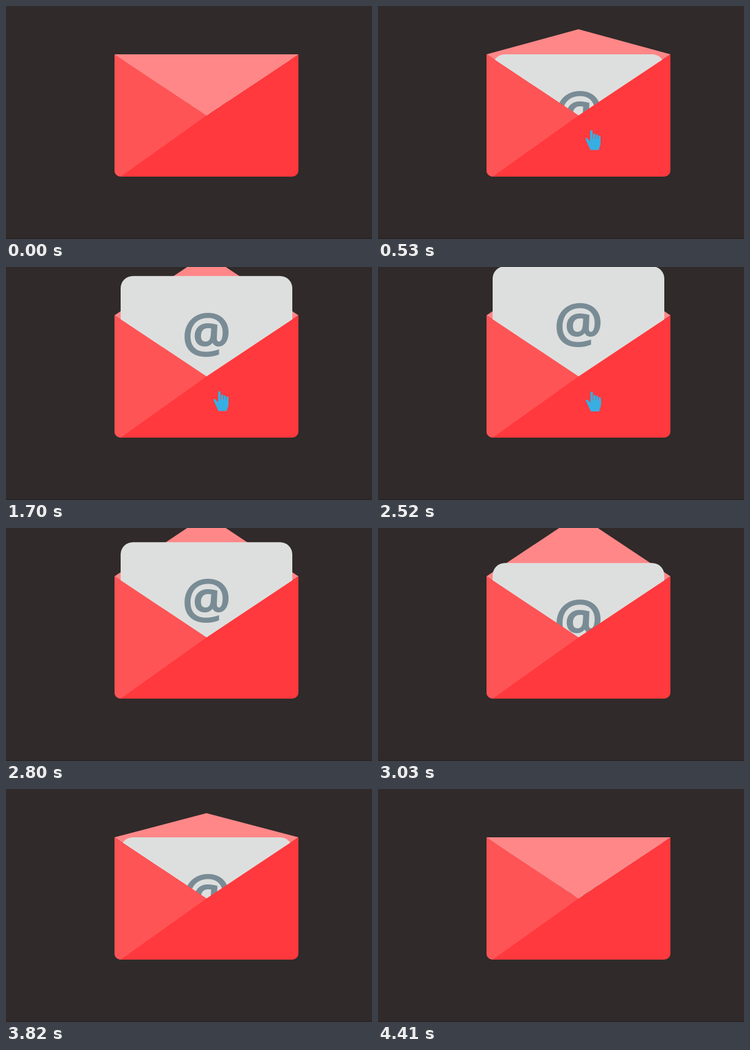
An HTML page that plays this animation: 597x381 px, repeating every 4610 ms.

```html
<!DOCTYPE html>
<html lang="en">
<head>
<meta charset="utf-8">
<title>Envelope</title>
<style>
  html, body { margin: 0; width: 100%; height: 100%; overflow: hidden; background: #302a2a; }
  svg { display: block; width: 597px; height: 381px; }
  text { font: 700 90px "Open Sans", "Noto Sans", sans-serif; }
</style>
</head>
<body>
<svg viewBox="0 0 597 381">
  <rect width="597" height="381" fill="#302a2a"/>
  <rect y="379" width="597" height="2" fill="#2a2424"/>
  <path d="M177 79H477L327 180Z" fill="#ff8788"/>
  <path id="flapBack" fill="#ff8788"/>
  <g id="letter">
    <rect x="187" width="280" height="190" rx="20" fill="#dddfde"/>
    <text x="327" y="125" text-anchor="middle" fill="#798c95">@</text>
  </g>
  <path d="M177 79L327 179L477 79V269A10 10 0 0 1 467 279H187A10 10 0 0 1 177 269Z" fill="#ff393d"/>
  <path d="M177 79L327 179L187 279A10 10 0 0 1 177 269Z" fill="#ff5456"/>
  <path id="flapFront" fill="#ff8788"/>
  <g id="hand" fill="#38aee2">
    <rect x="-2" width="4" height="22" rx="1.8"/>
    <rect x="2.7" y="5.5" width="3.6" height="16" rx="1.5"/>
    <rect x="7" y="7" width="3.6" height="14" rx="1.5"/>
    <rect x="11.3" y="9" width="3.7" height="13" rx="1.5"/>
    <path d="M-10 14Q-9 12-6.500 13.500L-2 18V14H15V23L12 32.500H-1.500Q-2-32-1.500 32.500L-4.500 26Z"/>
  </g>
</svg>
<script>
const LOOP = 4610;
const HOVER = { flapOpen: 163, letterUp: 1200, letterDown: 2598, flapClose: 3588 };
const $ = id => document.getElementById(id);
const clamp = v => Math.min(1, Math.max(0, v));

// Cubic Bezier (.25, .1, .25, 1), solved for x by bisection
function ease(x) {
  if (x <= 0 || x >= 1) return clamp(x);
  const curve = (s, a, b) => 3 * (1 - s) ** 2 * s * a + 3 * (1 - s) * s * s * b + s ** 3;
  let low = 0, high = 1;
  for (let i = 0; i < 24; i++) {
    const mid = (low + high) / 2;
    if (curve(mid, .25, .25) < x) low = mid; else high = mid;
  }
  return curve(low, .1, 1);
}

const there = (t, start, back) => ease((t - start) / 1000) - ease((t - back) / 1000);

function handAt(t) {
  if (t < 35 || t >= 2640) return null;
  if (t < 2500) {
    const left = (1 - clamp((t - 35) / 365)) ** 2;
    return [348 + 158 * left, 203 + 162 * left];
  }
  const drop = Math.min(114, 75 * ((t - 2500) / 95) ** 3);
  return [348 + .75 * drop, 203 + drop];
}

function draw(t) {
  const turn = Math.cos(Math.PI * there(t, HOVER.flapOpen, HOVER.flapClose));
  const flap = `M177 79H477L327 ${79 + 100 * turn}Z`;
  $("flapBack").setAttribute("d", turn < 0 ? flap : "");
  $("flapFront").setAttribute("d", turn < 0 ? "" : flap);

  const top = 79 - 80 * there(t, HOVER.letterUp, HOVER.letterDown);
  $("letter").setAttribute("transform", `translate(0 ${top})`);

  const hand = handAt(t);
  $("hand").setAttribute("visibility", hand ? "visible" : "hidden");
  if (hand) $("hand").setAttribute("transform", `translate(${hand})`);
}

const begin = performance.now();
function tick() {
  draw((performance.now() - begin) % LOOP);
  requestAnimationFrame(tick);
}
tick();
</script>
</body>
</html>
```
